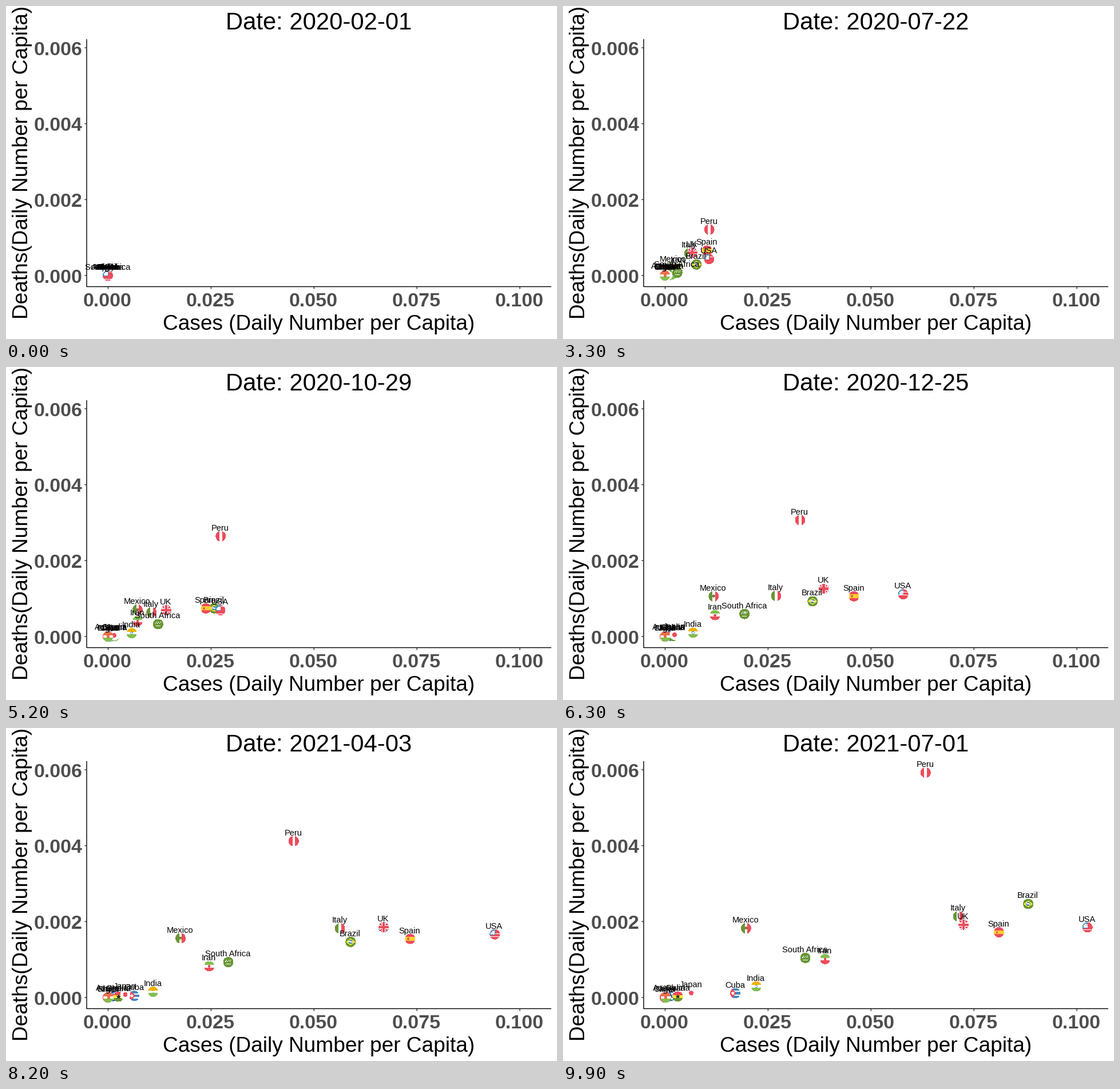
A matplotlib script for the animation above (10 s loop, 963x582 px).

```python
import numpy as np
import matplotlib.pyplot as plt
from matplotlib.animation import FuncAnimation
from matplotlib.collections import PolyCollection
from matplotlib.transforms import Affine2D

W, H, DPI = 963, 582, 100
FRAMES, DAYS = 100, 516
START = np.datetime64("2020-02-01")
X0, Y0 = 178, 471            # pixel position of the data origin
SX, SY = 0.72, 0.066333      # pixels per case in 10,000, per death in a million
RADIUS = 8.4

RED, GREEN, LIME, YELLOW = "#ed4c5c", "#699635", "#83bf4f", "#ffe62e"
GOLD, BLUE, NAVY, WHITE = "#ffce31", "#428bc1", "#2a5f9e", "#ffffff"
ORANGE = "#e8704a"

# Hard-hit countries pass four (cases, deaths) points, leaving the origin at KEYS[0]
KEYS = np.array([5, 21, 52, 73, 99])
PATHS = {
    "Brazil": [(14, 90), (258, 742), (467, 1134), (882, 2465)],
    "India": [(1, 2), (58, 88), (80, 114), (222, 293)],
    "Iran": [(15, 87), (72, 405), (184, 709), (389, 1013)],
    "Italy": [(38, 541), (106, 637), (457, 1568), (712, 2138)],
    "Mexico": [(4, 48), (72, 705), (157, 1365), (197, 1824)],
    "Peru": [(31, 450), (274, 2640), (381, 3485), (633, 5925)],
    "South Africa": [(3, 6), (122, 325), (255, 822), (341, 1041)],
    "Spain": [(49, 592), (238, 740), (654, 1387), (811, 1718)],
    "UK": [(37, 533), (142, 690), (607, 1764), (725, 1920)],
    "USA": [(48, 283), (273, 693), (846, 1485), (1026, 1846)],
}
# The others grow as a power of time: final cases, final deaths, exponent
GROWTH = {
    "Australia": (12, 36, 0.4),
    "China": (0, 0, 1),
    "Cuba": (171, 113, 5.2),
    "Ghana": (31.5, 26, 1.05),
    "Japan": (64, 116, 2.2),
    "Niger": (2.4, 0, 2),
}


def smooth(y):
    """Monotone cubic through the key steps, sampled at every frame."""
    h = np.diff(KEYS)
    d = np.diff(y) / h
    m = np.zeros(len(y))
    for k in range(1, len(d)):
        a, b = 2 * h[k] + h[k - 1], h[k] + 2 * h[k - 1]
        m[k] = (a + b) / (a / d[k - 1] + b / d[k])
    m[-1] = max(0, ((2 * h[-1] + h[-2]) * d[-1] - h[-1] * d[-2]) / (h[-1] + h[-2]))
    t = np.maximum(np.arange(FRAMES), KEYS[0])
    k = np.clip(np.searchsorted(KEYS, t, side="right") - 1, 0, len(h) - 1)
    u = (t - KEYS[k]) / h[k]
    ease = u * u * (3 - 2 * u)
    return (y[k] + (y[k + 1] - y[k]) * ease
            + h[k] * u * (1 - u) * ((1 - u) * m[k] - u * m[k + 1]))


def track(name):
    """Cases and deaths of a country at every frame."""
    if name in PATHS:
        pts = np.array([(0, 0)] + PATHS[name], float)
        return smooth(pts[:, 0]), smooth(pts[:, 1])
    cases, deaths, power = GROWTH[name]
    s = np.linspace(0, 1, FRAMES) ** power
    return cases * s, deaths * s


# Flag pieces live in a unit circle with y pointing down.
def rect(x0, y0, x1, y1, turn=0):
    """Rectangle cut to the unit circle, optionally turned."""
    y = np.linspace(max(y0, -1), min(y1, 1), 16)
    r = np.sqrt(1 - y**2)
    left, right = np.clip(-r, x0, x1), np.clip(r, x0, x1)
    pts = np.r_[np.c_[left, y], np.c_[right, y][::-1]]
    c, s = np.cos(np.radians(turn)), np.sin(np.radians(turn))
    return pts @ np.array([[c, s], [-s, c]])


def disc(r=1.0, x=0, y=0):
    a = np.linspace(0, 2 * np.pi, 40)
    return np.c_[x + r * np.cos(a), y + r * np.sin(a)]


def star(r, x=0, y=0):
    a = np.arange(10) * np.pi / 5 - np.pi / 2
    q = np.where(np.arange(10) % 2, r * 0.4, r)
    return np.c_[x + q * np.cos(a), y + q * np.sin(a)]


def rows(top, mid, low, cut=1 / 3):
    return [(mid, disc()), (top, rect(-1, -1, 1, -cut)), (low, rect(-1, cut, 1, 1))]


def cols(left, mid, right, cut=1 / 3):
    return [(mid, disc()), (left, rect(-1, -1, -cut, 1)), (right, rect(cut, -1, 1, 1))]


def cross(color, w, turns):
    return [(color, rect(-1, -w, 1, w, t)) for t in turns]


def usa():
    stripes = [(RED, rect(-1, y, 1, y + 2 / 13)) for y in -1 + np.arange(0, 13, 2) * 2 / 13]
    stars = [(WHITE, disc(0.08, x, y)) for x in (-0.7, -0.42, -0.14)
             for y in (-0.6, -0.35, -0.1) if x * x + y * y < 0.8]
    return [(WHITE, disc())] + stripes + [(BLUE, rect(-1, -1, 0.02, 0.07))] + stars


def cuba():
    a = np.radians(np.linspace(128, 232, 16))
    wedge = np.r_[np.c_[np.cos(a), np.sin(a)], [[0.12, 0]]]
    bands = [(BLUE, rect(-1, y, 1, y + 0.4)) for y in (-1, -0.2, 0.6)]
    return [(WHITE, disc())] + bands + [(RED, wedge), (WHITE, star(0.28, -0.5, 0))]


def australia():
    jack = [(WHITE, rect(-1, -0.5, 0, -0.2)), (WHITE, rect(-0.6, -1, -0.3, 0)),
            (RED, rect(-1, -0.41, 0, -0.29)), (RED, rect(-0.51, -1, -0.39, 0))]
    spots = [(-0.4, 0.45), (0.45, -0.55), (0.7, -0.1), (0.45, 0.55)]
    return [(NAVY, disc())] + jack + [(WHITE, star(0.2, *p)) for p in spots]


def south_africa():
    marks = [(x, -0.28 + 0.12 * (-1) ** k) for k, x in enumerate(np.linspace(-0.6, 0.45, 6))]
    return ([(GREEN, disc())]
            + [(WHITE, rect(x, y - 0.12, x + 0.13, y + 0.16)) for x, y in marks]
            + [(WHITE, rect(-0.5, 0.36, 0.5, 0.47))])


DIAMOND = np.array([[-0.88, 0], [0, -0.62], [0.88, 0], [0, 0.62]])
FLAGS = {
    "Australia": australia(),
    "Brazil": [(GREEN, disc()), (YELLOW, DIAMOND), (BLUE, disc(0.37)),
               (WHITE, rect(-0.34, -0.1, 0.34, 0.03, 15))],
    "China": [(RED, disc()), (YELLOW, star(0.35, -0.4, -0.2))],
    "Cuba": cuba(),
    "Ghana": rows(RED, YELLOW, GREEN) + [("#2b2b2b", star(0.36))],
    "India": rows("#f2b200", WHITE, LIME) + [(BLUE, disc(0.22)), (WHITE, disc(0.13))],
    "Iran": rows(LIME, WHITE, RED) + [(RED, disc(0.2))],
    "Italy": cols(GREEN, WHITE, RED),
    "Japan": [(WHITE, disc()), (RED, disc(0.4))],
    "Mexico": cols(GREEN, WHITE, RED) + [("#89664c", disc(0.2, 0, -0.05)),
                                         (LIME, rect(-0.2, 0.1, 0.2, 0.24))],
    "Niger": rows(ORANGE, WHITE, LIME) + [(ORANGE, disc(0.25))],
    "Peru": cols(RED, WHITE, RED),
    "South Africa": south_africa(),
    "Spain": rows(RED, GOLD, RED, 0.47) + [("#c8884a", rect(-0.62, -0.28, -0.2, 0.28)),
                                           (RED, rect(-0.52, -0.12, -0.3, 0.18))],
    "UK": [(NAVY, disc())] + cross(WHITE, 0.22, (45, -45)) + cross(RED, 0.08, (45, -45))
          + cross(WHITE, 0.32, (0, 90)) + cross(RED, 0.19, (0, 90)),
    "USA": usa(),
}

plt.rcParams["font.family"] = "Liberation Sans"
fig = plt.figure(figsize=(W / DPI, H / DPI), dpi=DPI, facecolor="white")
ax = fig.add_axes([0, 0, 1, 1])
ax.set_xlim(0, W)
ax.set_ylim(H, 0)
ax.axis("off")


def write(x, y, s, px, **kw):
    return ax.text(x, y, s, fontsize=px * 72 / DPI, va="baseline", **kw)


def line(x, y, color="black"):
    ax.plot(x, y, color=color, lw=1.42 * 72 / DPI, solid_capstyle="butt", snap=False, zorder=1)


# Axes
line([141, 141], [58, 491])
line([141, 953], [490.5, 490.5])
tick_style = dict(px=34, weight="bold", color="#4d4d4d")
for k in range(5):
    x = 178.5 + 179.9 * k
    line([x, x], [491, 494.7], "#333333")
    write(x - 1, 525, f"{0.025 * k:.3f}", ha="center", **tick_style)
for k in range(4):
    y = 471 - 132.67 * k
    line([137.3, 141], [y, y], "#333333")
    write(134, y + 12.7, f"{0.002 * k:.3f}", ha="right", **tick_style)
write(547, 566, "Cases (Daily Number per Capita)", 37, ha="center")
write(38, 273.5, "Deaths(Daily Number per Capita)", 37, ha="center",
      rotation=90, rotation_mode="anchor")
title = write(383.5, 41, "", 41.7, ha="left")


class Country:
    def __init__(self, name, order):
        cases, deaths = track(name)
        self.x, self.y = X0 + SX * cases, Y0 - SY * deaths
        self.place = Affine2D()
        colors, shapes = zip(*FLAGS[name])
        ax.add_collection(PolyCollection(shapes, facecolors=colors, linewidths=0,
                                         antialiaseds=False, zorder=2 + order / 100,
                                         transform=self.place + ax.transData), autolim=False)
        self.label = write(0, 0, name, 14.6, ha="center", zorder=4)

    def move(self, i):
        x, y = self.x[i], self.y[i]
        self.place.clear().scale(RADIUS).translate(x, y)
        self.label.set_position((x - 0.8, y - 10))


countries = [Country(name, k) for k, name in enumerate(sorted(FLAGS))]


def update(i):
    title.set_text(f"Date: {START + DAYS * i // (FRAMES - 1)}")
    for c in countries:
        c.move(i)
    return []


anim = FuncAnimation(fig, update, frames=FRAMES, interval=100, repeat=True,
                     repeat_delay=0, blit=False)
plt.show()
```
